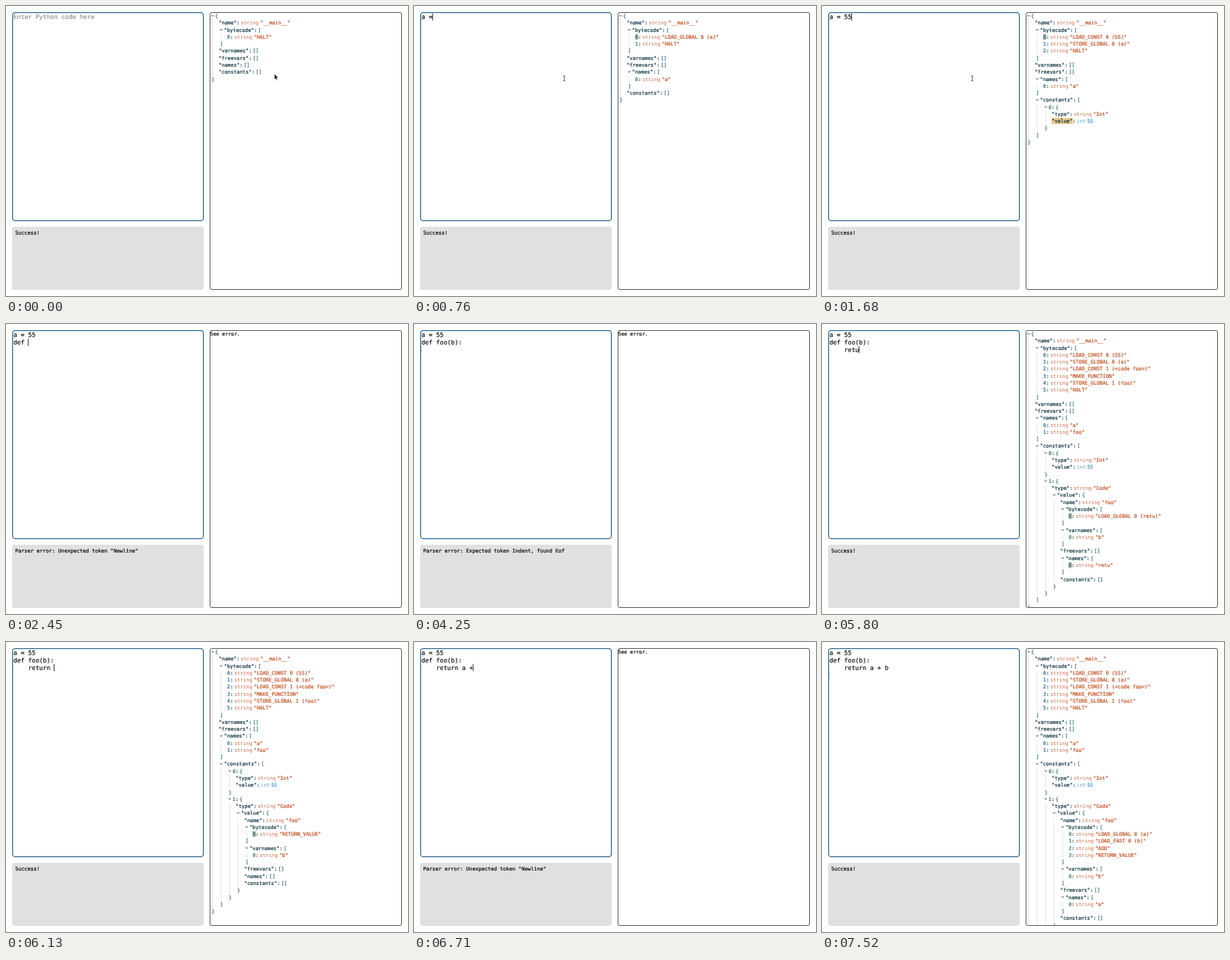
An HTML page that plays this animation: 590 by 425 pixels, repeating every 8 s.

```html
<!DOCTYPE html>
<html lang="en">
<head>
<meta charset="utf-8">
<title>Python bytecode playground</title>
<style>
html, body { margin: 0; width: 100%; height: 100%; overflow: hidden; background: #fff; }
svg { display: block; width: 590px; height: 425px; }
text { font-family: "DejaVu Sans Mono", monospace; white-space: pre; text-rendering: geometricPrecision; stroke-width: .18px; }
.code { font-size: 9px; fill: #111; stroke: #111; }
.code.hint { fill: #757575; stroke: none; }
.log { font-size: 7.5px; fill: #000; stroke: #000; }
.tree text, .small { font-size: 7.32px; }
.small { stroke: #000; }
.key { fill: #002b36; stroke: #002b36; }
.mark { fill: #236a7c; stroke: #236a7c; }
.str { fill: #c24313; stroke: #c24313; }
.int { fill: #338fb8; stroke: #338fb8; }
.type { opacity: .8; stroke: none; }
.guide { stroke: #e6e6e6; stroke-width: 1; }
.arrow { fill: none; stroke: #333; stroke-width: 1; }
</style>
</head>
<body>
<svg viewBox="0 0 590 425">
  <defs><clipPath id="clip"><rect x="299" y="9" width="282" height="407" rx="2.5"/></clipPath></defs>
  <rect x="9" y="323.5" width="281" height="92.5" rx="3" fill="#e0e0e0"/>
  <text id="log" class="log" x="13.4" y="335.4"></text>
  <g id="code"></g>
  <rect id="caret" width="1" height="10.4"/>
  <rect x="9.65" y="9.65" width="280" height="305" rx="4" fill="none" stroke="#245f8d" stroke-width="1.3"/>
  <g id="panel" clip-path="url(#clip)"></g>
  <rect x="299.5" y="9.5" width="281" height="406" rx="2.5" fill="none" stroke="#4a4a4a"/>
  <path id="arrow" d="M0 0v8.2l1.9-1.7 1.2 2.9 1.3-.6-1.2-2.7h2.5z" fill="#111" stroke="#fff" stroke-width=".5"/>
  <path id="beam" d="M-1.5-3.8Q0-3.8 0-2.8Q0-3.8 1.5-3.8M0-3V3M-1.5 3.8Q0 3.8 0 2.8Q0 3.8 1.5 3.8" fill="none" stroke="#333" stroke-width=".8"/>
</svg>
<script>
const LOOP = 8000, ROW = 10.27, CHAR = 4.407, INDENT = 12.45, FADE = 1000;
const el = id => document.getElementById(id);
const esc = s => String(s).replace(/&/g, '&amp;').replace(/</g, '&lt;');

// Program state after each edit
const code = (name, bytecode, varnames, names, constants) =>
  ({ name, bytecode, varnames, freevars: [], names, constants });
const main = (ops, names = [], constants = []) => code('__main__', [...ops, 'HALT'], [], names, constants);
const int = value => ({ type: 'Int', value });
const assign = n => [`LOAD_CONST 0 (${n})`, 'STORE_GLOBAL 0 (a)'];
const load = name => `LOAD_GLOBAL 0 (${name})`;
const bare = name => main([...assign(55), `LOAD_GLOBAL 1 (${name})`], ['a', name], [int(55)]);
const foo = (ops, names = []) => main(
  [...assign(55), 'LOAD_CONST 1 (<code foo>)', 'MAKE_FUNCTION', 'STORE_GLOBAL 1 (foo)'],
  ['a', 'foo'],
  [int(55), { type: 'Code', value: code('foo', ops, ['b'], names, []) }]);
const word = name => foo([load(name)], [name]);
const unexpected = token => `Unexpected token "${token}"`;
const expected = (token, found) => `Expected token ${token}, found ${found}`;

const L1 = 'a = 55\n', L2 = L1 + 'def foo(b):\n', L3 = L2 + '    ';
const edits = [
  [0, ''], [360, 'a'], [550, 'a '], [750, 'a ='], [950, 'a = '], [1470, 'a = 5'], [1640, 'a = 55'],
  [1830, L1], [2000, L1 + 'd'], [2120, L1 + 'de'], [2270, L1 + 'def'], [2450, L1 + 'def '],
  [2730, L1 + 'def f'], [2860, L1 + 'def fo'], [2990, L1 + 'def foo'], [3260, L1 + 'def foo('],
  [3470, L1 + 'def foo(b'], [3680, L1 + 'def foo(b)'], [3960, L1 + 'def foo(b):'], [4250, L2],
  [4480, L2 + ' '], [4660, L2 + '  '], [4860, L2 + '   '], [5030, L3],
  [5420, L3 + 'r'], [5490, L3 + 're'], [5600, L3 + 'ret'], [5720, L3 + 'retu'], [5840, L3 + 'retur'],
  [5960, L3 + 'return'], [6100, L3 + 'return '], [6250, L3 + 'return a'], [6420, L3 + 'return a '],
  [6590, L3 + 'return a +'], [6740, L3 + 'return a + '], [6900, L3 + 'return a + b'],
  [7300, L3 + 'return a + b\n']
];
const views = [
  [0, main([])],
  [390, main([load('a')], ['a'])],
  [780, unexpected('Newline')],
  [1500, main(assign(5), ['a'], [int(5)])],
  [1680, main(assign(55), ['a'], [int(55)])],
  [2030, bare('d')], [2150, bare('de')],
  [2450, unexpected('Newline')],
  [2760, expected('LeftParen', 'Eof')],
  [3280, unexpected('Newline')],
  [3750, expected('Colon', 'Newline')],
  [3980, expected('Indent', 'Eof')],
  [4510, unexpected('Eof')],
  [5450, word('r')], [5530, word('re')], [5640, word('ret')], [5760, word('retu')], [5880, word('retur')],
  [6000, foo(['RETURN_VALUE'])],
  [6280, foo([load('a'), 'RETURN_VALUE'], ['a'])],
  [6630, unexpected('Newline')],
  [6940, foo([load('a'), 'LOAD_FAST 0 (b)', 'ADD', 'RETURN_VALUE'], ['a'])]
];

// Lays out one JSON value; leaves that changed get a fading highlight
function drawTree(root, time, old) {
  const leaves = {}, flashes = {};
  let row = 0, out = '';
  const base = () => 17.1 + row * ROW;
  const put = (x, s, cls) => { out += `<text x="${x}" y="${base()}" class="${cls}">${esc(s)}</text>`; };

  function node(key, value, depth, path) {
    const list = Array.isArray(value), nested = typeof value === 'object';
    const open = nested && Object.keys(value).length > 0;
    const left = 299.7 + depth * INDENT;
    let x = left;
    if (open) {
      out += `<path class="arrow" d="M${left + 1.9} ${base() - 3.7}l1.8 1.7 1.8-1.7"/>`;
      x += key === null ? 7.1 : 7.9;
    }
    if (key !== null) {
      const index = typeof key === 'number', label = index ? String(key) : `"${key}"`;
      const width = label.length * CHAR;
      if (!nested) {
        leaves[path] = value;
        if (old && path in old.leaves)
          flashes[path] = old.leaves[path] === value ? old.flashes[path] : time;
        if (flashes[path] !== undefined)
          out += `<rect x="${x - .3}" y="${base() - 7.1}" width="${width + .6}" height="9" ` +
            `fill="${index ? '#bcbfb0' : '#ebcb8b'}" data-start="${flashes[path]}"/>`;
      }
      put(x, label, index ? 'mark' : 'key');
      put(x += width, ':', 'key');
      x += CHAR + 1.5;
    }
    if (!nested) {
      const text = typeof value === 'string', cls = text ? 'str' : 'int', type = text ? 'string' : 'int';
      put(x, type, cls + ' type');
      put(x + type.length * CHAR + 2.2, text ? `"${value}"` : value, cls);
    } else if (!open) {
      put(x, '[]', 'mark');
    } else {
      put(x, list ? '[' : '{', 'mark');
      const top = base() + 3;
      row++;
      for (const k of Object.keys(value)) node(list ? +k : k, value[k], depth + 1, path + '/' + k);
      out += `<path class="guide" d="M${left + 3.8} ${top}V${base() - 7.2}"/>`;
      put(left + 2.1, list ? ']' : '}', 'mark');
    }
    row++;
  }
  node(null, root, 0, '');
  return { out, leaves, flashes };
}

let prev = null;
for (const view of views) {
  const [time, data] = view;
  const g = document.createElementNS('http://www.w3.org/2000/svg', 'g');
  if (typeof data === 'string') {
    prev = null;
    g.innerHTML = '<text class="small" x="299.5" y="16.6">See error.</text>';
    view.log = 'Parser error: ' + data;
  } else {
    prev = drawTree(data, time, prev);
    g.setAttribute('class', 'tree');
    g.innerHTML = prev.out;
    view.log = 'Success!';
  }
  g.style.display = 'none';
  el('panel').append(g);
  view.group = g;
  view.flashes = [...g.querySelectorAll('[data-start]')];
}

const at = (list, t) => list.findLast(item => item[0] <= t);
const pointer = [[0, 394, 99.5], [50, 356, 101], [130, 268, 103], [210, 220.5, 106]];
let edit, view;

function showText(text) {
  const lines = text.split('\n'), last = lines[lines.length - 1];
  const line = (s, i) => `<text class="code" x="10.9" y="${19.2 + i * 10.65}">${esc(s)}</text>`;
  el('code').innerHTML = text ? lines.map(line).join('')
    : '<text class="code hint" x="10.9" y="19.2">Enter Python code here</text>';
  const caret = el('caret');
  caret.setAttribute('x', 10.5 + last.length * 5.418);
  caret.setAttribute('y', 11 + (lines.length - 1) * 10.65);
  caret.setAttribute('fill', last ? '#222' : '#b3cfe8');
  caret.style.display = text ? '' : 'none';
}

function place(node, visible, x, y) {
  node.style.display = visible ? '' : 'none';
  node.setAttribute('transform', `translate(${x} ${y})`);
}

function render(t) {
  const nextEdit = at(edits, t), nextView = at(views, t);
  if (nextEdit !== edit) showText((edit = nextEdit)[1]);
  if (nextView !== view) {
    if (view) view.group.style.display = 'none';
    view = nextView;
    view.group.style.display = '';
    el('log').textContent = view.log;
  }
  for (const f of view.flashes) {
    const age = Math.min(1, (t - f.dataset.start) / FADE);
    f.setAttribute('opacity', 1 - age * age);
  }
  const [, x, y] = at(pointer, t);
  place(el('arrow'), t < 130, x, y);
  place(el('beam'), t >= 130 && t < 2200, x, y);
}

const start = performance.now();
function tick() {
  render((performance.now() - start) % LOOP);
  requestAnimationFrame(tick);
}
tick();
</script>
</body>
</html>
```
